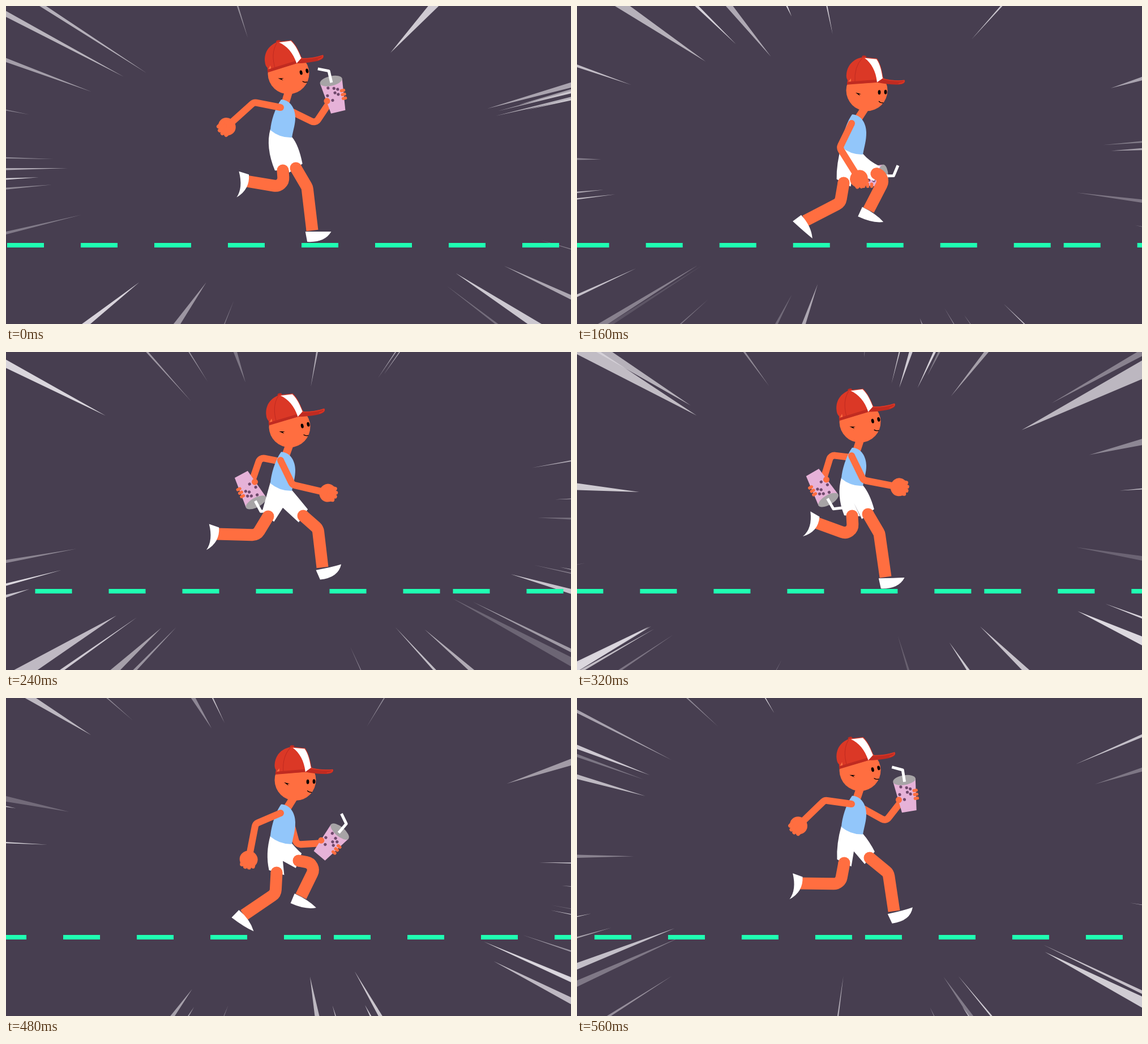
An HTML page with a canvas for the animation above (0.6 s loop, 998x561 px).

```html
<!DOCTYPE html>
<html lang="en">
<head>
<meta charset="utf-8">
<title>Runner with bubble tea</title>
<style>
html, body { margin: 0; width: 100%; height: 100%; overflow: hidden; background: #473e50; }
canvas { display: block; }
</style>
</head>
<body>
<canvas id="stage" width="998" height="561"></canvas>
<script>
const ctx = document.getElementById('stage').getContext('2d');
const LOOP = 600, STEP = 40, KEY = 80, KEYS = 8;
const SKIN = '#ff6e40', RED = '#db3826', DARK = '#c02b21', WHITE = '#fff';
const RAD = Math.PI / 180;

// Key poses every 80 ms. Legs: thigh x,y, knee x,y, ankle x,y, shoe angle.
const LEG_A = [
  [512, 286, 532, 320, 541, 396, -23], [494, 309, 498, 338, 473, 399, -6],
  [471, 312, 465, 347, 403, 379, 41], [463, 290, 443, 323, 372, 321, 96],
  [486, 289, 488, 325, 422, 301, 107], [517, 300, 531, 317, 468, 339, 58],
  [517, 287, 549, 293, 521, 350, 10], [517, 282, 550, 309, 560, 376, -38]];
const LEG_B = [
  [489, 290, 491, 320, 425, 309, 95], [518, 298, 531, 316, 469, 339, 58],
  [530, 296, 546, 300, 515, 360, 12], [525, 289, 551, 312, 559, 380, -36],
  [514, 286, 534, 320, 545, 397, -25], [496, 311, 500, 340, 476, 399, -6],
  [478, 308, 476, 345, 420, 383, 32], [472, 291, 465, 328, 394, 327, 97]];
// Upper arm and forearm angles; head x and tilt.
const NEAR_ARM = [[191, 138], [168, 113], [116, 58], [64, 13], [64, 11], [110, 52], [157, 101], [188, 136]];
const FAR_ARM = [[26, -56], [60, -20], [120, 46], [191, 109], [187, 107], [135, 50], [75, -3], [29, -52]];
const HEAD = [[499, -13], [509, -.6], [512, 0], [501, -12.4], [500, -12.8], [510, -.4], [511, -.6], [500, -12.4]];

const PEARLS = [[-8, -45], [2, -42], [8, -39], [2, -34], [7, -30], [-12, -32], [-5, -22]];

const keyTime = j => Math.floor(j / KEYS) * LOOP + KEY * ((j + KEYS) % KEYS);

// Smooth periodic interpolation through the key poses.
function pose(rows, t) {
  const i = Math.floor(t / KEY), h = keyTime(i + 1) - keyTime(i), u = (t - keyTime(i)) / h;
  return rows[0].map((_, c) => {
    const v = j => rows[(j + KEYS) % KEYS][c];
    const slope = j => (v(j + 1) - v(j - 1)) / (keyTime(j + 1) - keyTime(j - 1)) * h;
    const a = v(i), b = v(i + 1), s = u * u * (3 - 2 * u);
    return a + (b - a) * s + slope(i) * u * (1 - u) ** 2 - slope(i + 1) * u * u * (1 - u);
  });
}

const random = n => { const v = Math.sin(n * 12.9898) * 43758.5453; return v - Math.floor(v); };

function fill(color, path) {
  ctx.fillStyle = color;
  ctx.fill(new Path2D(path));
}

function stroke(color, width, path, cap = 'butt') {
  ctx.strokeStyle = color;
  ctx.lineWidth = width;
  ctx.lineCap = cap;
  ctx.lineJoin = 'round';
  ctx.stroke(new Path2D(path));
}

function oval(color, x, y, rx, ry = rx) {
  ctx.fillStyle = color;
  ctx.beginPath();
  ctx.ellipse(x, y, rx, ry, 0, 0, 7);
  ctx.fill();
}

function placed(x, y, degrees, draw) {
  ctx.save();
  ctx.translate(x, y);
  ctx.rotate(degrees * RAD);
  draw();
  ctx.restore();
}

function limb(x0, y0, x1, y1, x2, y2, width, bend) {
  const path = new Path2D();
  path.moveTo(x0, y0);
  path.arcTo(x1, y1, x2, y2, bend);
  path.lineTo(x2, y2);
  stroke(SKIN, width, path);
  oval(SKIN, x0, y0, width / 2);
}

function speedLines(frame) {
  for (let i = 0; i < 26; i++) {
    const r = k => random(frame * 131 + i * 5 + k + 1);
    const a = r(0) * 2 * Math.PI, reach = 1 + .38 * r(1);
    const x = 390 * reach * Math.cos(a), y = 205 * reach * Math.sin(a);
    placed(499 + x, 280 + y, Math.atan2(y, x) / RAD, () => {
      const half = 6 + 20 * r(2) ** 2;
      ctx.globalAlpha = .12 + .88 * Math.sqrt(r(3));
      fill('#dcd8df', `M0,0L420,${-half}V${half}Z`);
    });
  }
}

function road(frame) {
  const shift = 35.08 * frame;
  ctx.fillStyle = '#1fffb2';
  for (let i = 0; i < 8; i++)
    for (const start of [2, 1000]) ctx.fillRect(start + 130 * i - shift, 418, 65, 8);
}

function cup() {
  fill('#e6b2d8', 'M-13,0L-20,-56H20L13,0Z');
  oval('#a7a4a6', 0, -56, 20, 8.5);
  stroke(WHITE, 5, 'M0,-53V-74L-18,-82');
  for (const [x, y] of PEARLS) oval('#70496c', x, y, 2.6);
  oval(SKIN, -15, -23, 5.5);
  for (const y of [-35, -28, -21]) stroke(SKIN, 5.5, `M14,${y}h4`, 'round');
}

function fist() {
  oval(SKIN, 64, 0, 15, 16);
  [-10, -3.5, 3.5, 10].forEach((y, i) =>
    stroke(SKIN, 7, `M66,${y}H${i % 3 ? 78 : 75}`, 'round'));
}

function arm(x, y, [upper, fore], upperLength, foreLength, hand) {
  const ex = x + upperLength * Math.cos(upper * RAD), ey = y + upperLength * Math.sin(upper * RAD);
  limb(x, y, ex, ey, ex + foreLength * Math.cos(fore * RAD), ey + foreLength * Math.sin(fore * RAD), 12, 9);
  placed(ex, ey, fore, hand);
}

function leg([sx, sy, kx, ky, ax, ay, angle]) {
  limb(sx, sy, kx, ky, ax, ay, 21, 14);
  placed(ax, ay, angle, () =>
    fill(WHITE, `M-16,15l4,-18Q14,${5 - .13 * angle} 30,15Q12,${24 - .2 * angle} -16,15Z`));
}

function shorts(legs, drop) {
  const [back, front] = [...legs].sort((a, b) => a[0] - b[0]);
  const hem = ([x, y], side) => {
    const a = Math.atan2(y - 250 - drop, x - 488);
    return `${x - side * 14 * Math.sin(a)},${y + side * 14 * Math.cos(a)}`;
  };
  placed(0, 0, 0, () => fill(WHITE,
    `M467,${217 + drop}Q458,${249 + drop} ${hem(back, 1)}L${hem(back, -1)}L489,${262 + drop}` +
    `L${hem(front, 1)}L${hem(front, -1)}Q517,${245 + drop} 505,${231 + drop}Z`));
}

function torso(drop) {
  const top = .88 * drop;
  fill('#92c6fa',
    `M486,${165 + top}C475,${180 + top} 468,${204 + drop} 467,${219 + drop}` +
    `Q484,${233 + drop} 505,${232 + drop}C508,${216 + drop} 511,${208 + drop} 511,${197 + top}` +
    `C511,${182 + top} 503,${166 + top} 486,${165 + top}Z`);
}

function head() {
  oval(SKIN, 0, 0, 36.5);
  oval('#000', 22, 3.5, 2.4, 4);
  oval('#000', 33, 3, 2.4, 4);
  stroke('#000', 1.3, 'M21,19Q24,22.5 29,22');
  fill('#000', 'M-20,4L-10,6.5L-14,7L-12,10Z');

  oval(DARK, -5, -59, 4, 2.5);
  fill(RED, 'M-35,-11L-34,-18Q-37,-22 -36,-29C-34,-46 -22,-57 -5,-58.5L18,-56C25,-45 27,-33 29,-21L19,-14Z');
  fill(SKIN, 'M-33,-15L-28,-21V-15Z');
  stroke(DARK, 1, 'M-8,-57Q-23,-42 -21,-13');
  fill(DARK, 'M-35,-15L19,-19V-14L-35,-10Z');
  fill(WHITE, 'M-4,-57L17,-55C24,-45 26,-33 28,-21L18,-14C16,-34 8,-48 -4,-57Z');
  fill(DARK, 'M18,-14L28,-21Q48,-16 67,-18Q69,-10 52,-10Q34,-10.5 18,-14Z');
  stroke(RED, 1.5, 'M28,-20.5Q48,-15.5 66,-17.5Q67,-13 56,-12');
}

function runner(t) {
  const drop = 32 * (1 - Math.abs(1 - t % 300 / 150));
  const legs = [pose(LEG_A, t), pose(LEG_B, t)];
  const [hx, tilt] = pose(HEAD, t), hy = 119 + drop;

  arm(500, 184 + .95 * drop, pose(FAR_ARM, t), 52, 42, () => placed(39, 22, 43, cup));
  stroke(SKIN, 14, `M490,${182 + .9 * drop}L${hx + 4},${hy + 20}`);
  shorts(legs, drop);
  legs.forEach(leg);
  torso(drop);
  placed(hx, hy, tilt, head);
  arm(485, 179 + .94 * drop, pose(NEAR_ARM, t), 48, 54, fist);
}

function draw(now) {
  const frame = Math.floor(now % LOOP / STEP);
  ctx.fillStyle = '#473e50';
  ctx.fillRect(0, 0, 998, 561);
  speedLines(frame);
  road(frame);
  runner(frame * STEP);
  requestAnimationFrame(draw);
}
requestAnimationFrame(draw);
</script>
</body>
</html>
```
